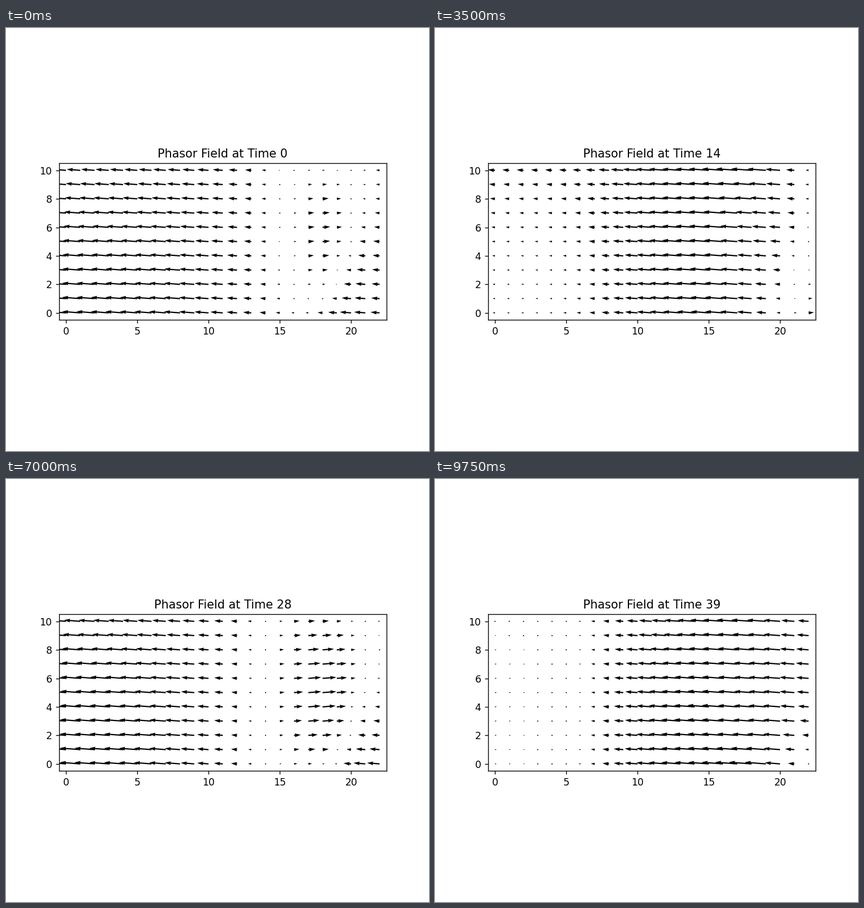
Animation, 748 px wide and 748 px high, one loop 10 s. Source, as a matplotlib script:

```python
import numpy as np
import matplotlib.pyplot as plt
from matplotlib.animation import FuncAnimation

SIZE = 748
FRAMES = 40
INTERVAL = 250
NX, NY = 23, 11
PERIOD = 31.3  # frames per cycle of the field

x, y = np.meshgrid(np.arange(NX), np.arange(NY))
low = 1 - y / (NY - 1)  # 1 on the bottom row, 0 on the top row


def bump(center, width):
    return np.exp(-((x - center) / width) ** 2)


# Steady leftward flow, stronger mid-left and weaker near the right edge.
steady = (-17 - 7 * bump(11, 4) + 9 * bump(22.5, 2)
          + 44 * low * (1 - low) * bump(18, 2))

# Standing wave: the left and right halves swing in opposite phase.
swing = ((20 - 6 * (1 - low) ** 3) * np.tanh((10 - x) / 4)
         - (12 - 8 * low ** 3) * bump(17, 3)
         + (10 + 26 * low ** 2) * bump(22, 1.7 + 0.8 * low))

# Part that lags a quarter cycle behind, mostly at the right edge.
lag = -6 * (1 - low) ** 2 + 12 * bump(22.5 - 3 * low ** 2, 2)


def field_at(frame):
    """Arrow components in pixels."""
    theta = 2 * np.pi * frame / PERIOD
    a = theta - np.radians(125)
    ripple = 4 * np.cos(2 * theta - 0.126 * x)
    u = steady + swing * np.cos(a) + lag * np.sin(a) - ripple
    v = 0.2 + 0.07 * np.abs(u)
    return u, v


fig = plt.figure(figsize=(6, 6), dpi=SIZE / 6, facecolor="white")
ax = fig.add_axes([0.125, 0.11, 0.775, 0.77])
ax.set_aspect("equal")
ax.set_xlim(-0.5, NX - 0.5)
ax.set_ylim(-0.5, NY - 0.5)
ax.set_xticks(range(0, NX, 5))
ax.set_yticks(range(0, NY, 2))
title = ax.set_title("")

arrows = ax.quiver(x, y, *field_at(0), color="black",
                   scale=1, scale_units="dots")


def draw(frame):
    arrows.set_UVC(*field_at(frame))
    title.set_text(f"Phasor Field at Time {frame}")
    return arrows, title


anim = FuncAnimation(fig, draw, frames=FRAMES, interval=INTERVAL,
                     repeat=True, repeat_delay=0)
plt.show()
```
